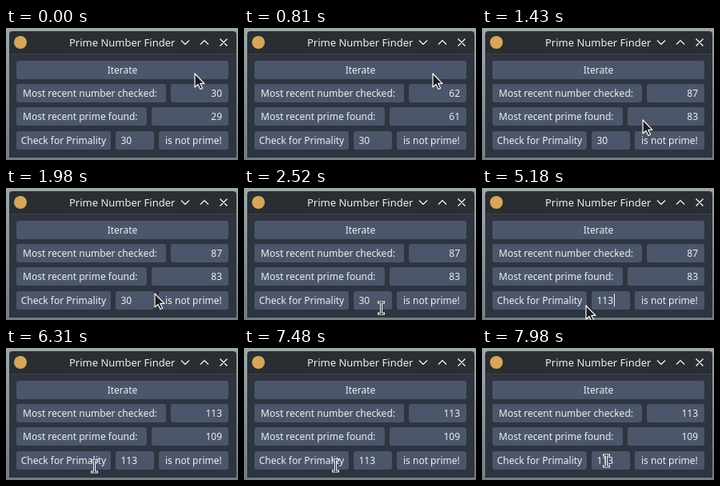
Recreate the animation shown at these times as an HTML page with a canvas. Size 290x165 px, loop 8 s.

```html
<!DOCTYPE html>
<html lang="en">
<head>
<meta charset="utf-8">
<title>Prime Number Finder</title>
<style>
  html, body { margin: 0; width: 100%; height: 100%; overflow: hidden; background: #2e3440; }
  canvas { display: block; width: 290px; height: 165px; }
</style>
</head>
<body>
<canvas id="stage" width="290" height="165"></canvas>
<script>
const ctx = document.getElementById('stage').getContext('2d');
const LOOP = 8000;
const STEP = 1000 / 24;
const FONT = '"Noto Sans", "Open Sans", sans-serif';
const INK = '#eceff4';
const LEFT = 13, RIGHT = 278, GAP = 6;
const ARROW = new Path2D('M0 0V17l4-3.5 3 6 2.6-1.2-2.8-6H12z');
const BEAM = new Path2D('M.5-7V7M-2.5-7h6M-2.5 7h6');

const HOME = { x: 236, y: 57 };
const MOVES = [
  { from: 1260, to: 1429, x: 201, y: 115 },
  { from: 1429, to: 2512, x: 171, y: 149 },
  { from: 2512, to: 2925, x: 143, y: 156 },
  { from: 4600, to: 5175, x: 130, y: 147 },
  { from: 5310, to: 5675, x: 110, y: 147 },
  { from: 7350, to: 7970, x: 155, y: 140 }
];

const clamp = (v, lo, hi) => Math.min(hi, Math.max(lo, v));
const ease = u => u * u * (3 - 2 * u);
const snap = t => 304 + Math.floor((t - 304) / STEP) * STEP;
const rowTop = i => Math.floor(41 + 29.35 * i);

function pointerAt(t) {
  let { x, y } = HOME;
  for (const m of MOVES) {
    const e = ease(clamp((t - m.from) / (m.to - m.from), 0, 1));
    x += (m.x - x) * e;
    y += (m.y - y) * e;
  }
  return [Math.round(x), Math.round(y)];
}

// One number per 60 Hz tick while a button is held
function checkedAt(t) {
  const iterated = clamp((t - 270) * 0.06, 0, 57);
  const searched = clamp((t - 5904) * 0.066, 0, 26);
  return 30 + Math.floor(iterated) + Math.floor(searched);
}

function isPrime(n) {
  for (let d = 2; d * d <= n; d++) if (n % d === 0) return false;
  return n > 1;
}

function primeBelow(n) {
  do n--; while (!isPrime(n));
  return n;
}

function fieldAt(t) {
  if (t < 3180) return '30';
  return '113'.slice(0, clamp(Math.floor((t - 3770) / 40), 0, 3));
}

const caretAt = t => (t >= 4060 && t < 4270) || (t >= 4640 && t < 5930);

function text(str, x, y, align = 'left', size = 12) {
  ctx.font = `${size}px ${FONT}`;
  ctx.textAlign = align;
  ctx.fillStyle = INK;
  ctx.fillText(str, x, y);
}

function panel(color, x, y, w, h, radius) {
  ctx.fillStyle = color;
  ctx.beginPath();
  ctx.roundRect(x, y, w, h, radius);
  ctx.fill();
}

function cell(row, from, to, label, align = 'left', pad = 8) {
  const y = rowTop(row);
  panel('#4c566a', from, y, to - from, 23, 3);
  const x = { left: from + pad, center: (from + to) / 2, right: to - pad }[align];
  text(label, x, y + 16, align);
}

function pair(row, split, label, value) {
  cell(row, LEFT, split, label);
  cell(row, split + GAP, RIGHT, value, 'right');
}

function stroke(path, color, width) {
  ctx.strokeStyle = color;
  ctx.lineWidth = width;
  ctx.stroke(path);
}

function drawWindow() {
  const wall = ctx.createLinearGradient(0, 0, 0, 165);
  wall.addColorStop(0, '#9ca8a8');
  wall.addColorStop(1, '#727d83');
  ctx.fillStyle = wall;
  ctx.fillRect(0, 0, 290, 165);

  panel('#2a2e32', 4, 4, 284, 158, [4, 4, 0, 0]);
  panel('#2e3440', 4, 33, 284, 129, 0);
  panel('#3b414c', 4, 32, 284, 1, 0);
  panel('#d6a75a', 10, 10, 16, 16, 8);

  text('Prime Number Finder', 79, 23, 'left', 13);
  const buttons = new Path2D('M219 15.5l5 5 5-5M243 20.5l5-5 5 5M267.5 13.5l9 9m0-9l-9 9');
  stroke(buttons, '#fcfcfc', 1.2);
}

function drawForm(t, q) {
  const n = checkedAt(q);
  cell(0, LEFT, RIGHT, 'Iterate', 'center');
  pair(1, 200, 'Most recent number checked:', n);
  pair(2, 176, 'Most recent prime found:', primeBelow(n));
  cell(3, LEFT, 131, 'Check for Primality', 'center');
  cell(3, 137, 185, fieldAt(t), 'left', 6.5);
  cell(3, 191, RIGHT, 'is not prime!');
  if (caretAt(t)) panel(INK, 165, 132, 1, 16, 0);
}

function drawArrow() {
  ctx.fillStyle = '#1b1e20';
  ctx.fill(ARROW);
  stroke(ARROW, '#fcfcfc', 1.2);
}

function drawBeam() {
  ctx.translate(0, 1);
  stroke(BEAM, '#fcfcfc', 3);
  stroke(BEAM, '#1b1e20', 1);
}

function drawPointer(q) {
  const [x, y] = pointerAt(q);
  const inField = x >= 137 && x < 185 && y >= 129 && y < 152;
  ctx.save();
  ctx.translate(x, y);
  ctx.lineJoin = 'round';
  ctx.lineCap = 'square';
  if (inField && q < 3000 || q > 5340) drawBeam();
  else drawArrow();
  ctx.restore();
}

function frame(now) {
  const t = now % LOOP, q = snap(t);
  drawWindow();
  drawForm(t, q);
  drawPointer(q);
  requestAnimationFrame(frame);
}
requestAnimationFrame(frame);
</script>
</body>
</html>
```
